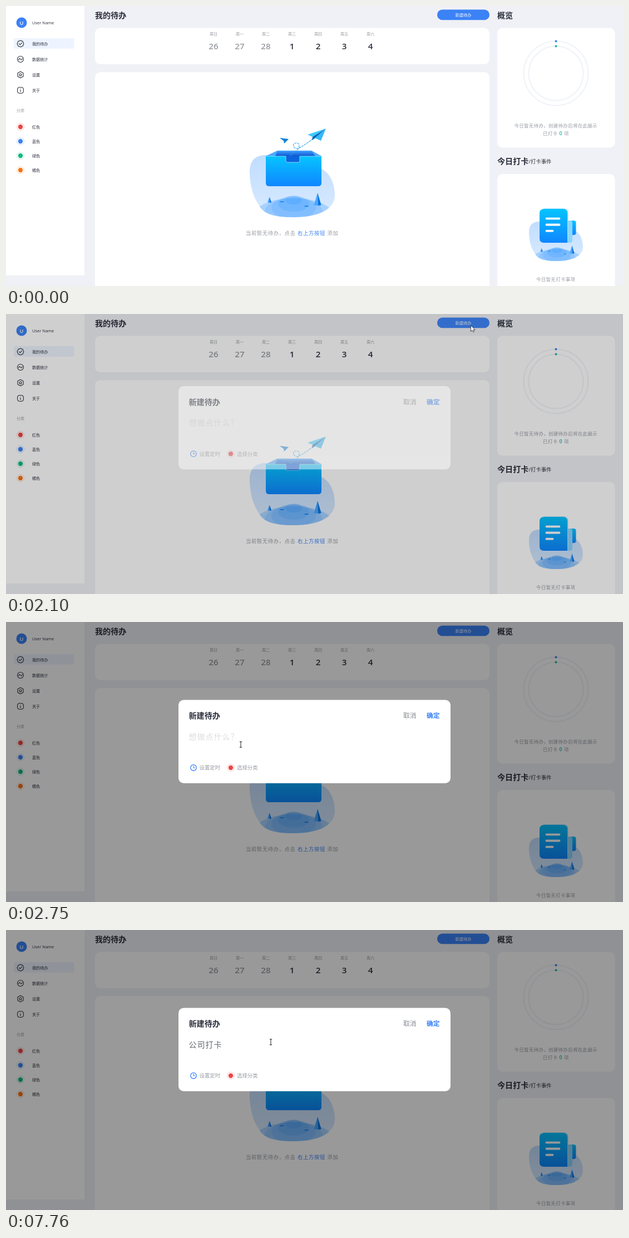
Animation of 1109x505 px, one loop 7.99 s. Source, as an HTML page:

```html
<!DOCTYPE html>
<html>
<head>
<meta charset="utf-8">
<style>
html, body { margin: 0; width: 100%; height: 100%; overflow: hidden; background: #f0f1f6; }
svg { display: block; width: 100vw; height: 100vh; }
text { font-family: "Open Sans", "Noto Sans CJK SC", "Noto Sans CJK", sans-serif; white-space: pre; }
</style>
</head>
<body>
<svg id="stage" viewBox="0 0 1109 505"></svg>
<script>
const INK = '#2b2f3c', GRAY = '#999ca3', BLUE = '#3b82f6', RED = '#ef4444', GREEN = '#10b981';
const LOOP = 7990;

// Text whose glyphs are centred vertically on cy.
const text = (x, cy, str, size, fill = INK, weight = 400, extra = '') =>
  `<text x="${x}" y="${cy + size * .37}" font-size="${size}" fill="${fill}" font-weight="${weight}" ${extra}>${str}</text>`;
const rect = (x, y, w, h, r, fill, extra = '') =>
  `<rect x="${x}" y="${y}" width="${w}" height="${h}" rx="${r}" fill="${fill}" ${extra}/>`;
const circle = (x, y, r, fill, extra = '') =>
  `<circle cx="${x}" cy="${y}" r="${r}" fill="${fill}" ${extra}/>`;
const path = (d, fill, extra = '') => `<path d="${d}" fill="${fill}" ${extra}/>`;
const line = (d, color, width, extra = '') =>
  path(d, 'none', `stroke="${color}" stroke-width="${width}" stroke-linecap="round" stroke-linejoin="round" ${extra}`);
const gradient = (id, from, to) =>
  `<linearGradient id="${id}" x2="0" y2="1"><stop stop-color="${from}"/><stop offset="1" stop-color="${to}"/></linearGradient>`;
const spaced = em => `letter-spacing="${em}"`;
const centred = 'text-anchor="middle"';
const colorDot = (x, y, color) =>
  circle(x, y, 4.2, color) + circle(x, y, 6.3, 'none', `stroke="${color}" stroke-width=".7" opacity=".45"`);

function sidebar() {
  const badge = Array.from({ length: 33 }, (_, i) => {
    const a = i / 32 * 2 * Math.PI, r = 5.6 + .35 * Math.cos(8 * a);
    return `${(r * Math.cos(a)).toFixed(2)} ${(r * Math.sin(a)).toFixed(2)}`;
  });
  const icons = [
    `M${badge.join('L')}M-2.4 0L-.6 1.8 2.6 -1.6`,
    'M-5.5 0A5.5 5.5 0 1 0 5.5 0A5.5 5.5 0 1 0 -5.5 0M-3.4 1.3C-2 -2.6 -.9 -1.6 0 0S2 2 3.4 -1.3',
    'M0 -5.7L5 -2.9V2.9L0 5.7L-5 2.9V-2.9ZM-2 0A2 2 0 1 0 2 0A2 2 0 1 0 -2 0',
    'M0 -5.5C4.4 -5.5 5.5 -4.4 5.5 0S4.4 5.5 0 5.5S-5.5 4.4 -5.5 0S-4.4 -5.5 0 -5.5M0 -.4V2.6M0 -2.6V-2.5'
  ];
  const nav = ['我的待办', '数据统计', '设置', '关于'].map((label, i) =>
    line(icons[i], INK, 1.1, `transform="translate(26 ${68 + 28 * i})"`) + text(47, 68 + 28 * i, label, 7.1, INK, 500));
  const tags = [['红色', RED], ['蓝色', BLUE], ['绿色', GREEN], ['橘色', '#f97316']].map(([label, color], i) =>
    colorDot(26, 218 + 26 * i, color) + text(47, 218 + 26 * i, label, 7.1, INK, 500));
  return rect(0, 0, 141, 486, 0, '#fff') + circle(28, 30, 9.5, BLUE) +
    text(28, 30.3, 'U', 9.4, '#fff', 600, centred) + text(47, 30, 'User Name', 7.5, INK, 500) +
    rect(14, 58, 108.5, 19, 3, '#eef4ff') + nav.join('') + text(19, 188, '分类', 7.1, GRAY) + tags.join('');
}

// Pale hill with rippled ground and two cones, shared by both pictures.
function hill() {
  const blob = 'M438 303C437 280 447 269 466 269C500 268 520 292 562 292C580 297 591 317 591 341' +
    'C591 366 563 381 517 381C482 381 463 375 455 360C444 344 439 325 438 303Z';
  const ripples = [[72, 31, .3], [52, 25, .2], [40, 20, .2], [28, 14, .25], [15, 8, .3]].map(([rx, ry, o], i) =>
    `<ellipse cx="517" cy="${378 - i * 7}" rx="${rx}" ry="${ry}" fill="#3d9bff" opacity="${o}"/>`);
  const cone = (x, y, w, h) => path(`M${x} ${y - h}L${x - w} ${y}Q${x} ${y + 2} ${x + w} ${y}Z`, '#4aa8ff') +
    path(`M${x} ${y - h}L${x + w * .2} ${y + 1}L${x + w} ${y}Z`, '#0b72e0');
  return path(blob, 'url(#pale)') + `<g clip-path="url(#hillClip)">${ripples.join('')}</g>` +
    cone(473.5, 354, 3.5, 9.5) + cone(560, 359, 6.5, 22) +
    `<g fill="#1f86ee"><ellipse cx="496" cy="353" rx="4" ry="1"/><ellipse cx="540" cy="361" rx="4" ry="1"/></g>` +
    `<clipPath id="hillClip">${path(blob, '#000')}</clipPath>`;
}

function boxPicture() {
  return hill() +
    path('M467 271L488 261H549L567 271Z', 'url(#inner)') +
    path('M467 271L488 261L484 271ZM549 261L567 271H556Z', '#4aa9ff') +
    path('M467 271H567V319Q567 325 561 325H473Q467 325 467 319Z', 'url(#front)') +
    path('M503 271H528V279Q528 282 525 282H506Q503 282 503 279Z', '#0d63dd') +
    line('M467.5 271H503V279Q503 282 506 282H525Q528 282 528 279V271H566.5', '#8fe4ff', .9) +
    line('M467 271L488 261H549L567 271', '#6bbcff', .6) +
    line('M552 239C541 248 531 254 525 257C515 258 514 247 521 247C529 246 528 256 523 260C518 264 514 266 511 270', '#2ba3e8', 1.1, 'stroke-dasharray="3.2 2.2"') +
    path('M575 221L542 232L551 236Z', '#3fcaff') + path('M575 221L551 236L550 242L556 238Z', '#0d62b8') +
    path('M575 221L555 238L566 243Z', '#35b9f8') +
    path('M492 238L508 240L499 243Z', '#35c3fb') + path('M492 238L499 243L500 248L508 240Z', '#1680d5');
}

function notePicture() {
  return `<g transform="translate(662.3 218.4) scale(.634)">${hill().replaceAll('hillClip', 'noteClip')}</g>` +
    rect(1010, 387, 14.5, 26, 4, 'url(#front)') + rect(1008, 387, 10, 40, 4, '#8bd5ff') +
    rect(961, 365, 49.5, 61, 8, '#a8dcff') + path('M967 366H1001Q1009 366 1009 374V427H967Q959 427 959 419V374Q959 366 967 366Z', 'url(#front)') +
    line('M971.5 383.3H994.5M971.5 394.5H994.5M971.5 405.7H982.5', '#fff', 3.8);
}

function page() {
  const days = [...'日一二三四五六'].map((day, i) => {
    const x = 373 + 47 * i;
    return text(x, 50, '周' + day, 7.1, GRAY, 400, centred) +
      text(x, 72, [26, 27, 28, 1, 2, 3, 4][i], 15.2, i < 3 ? GRAY : INK, 600, centred);
  });
  const ring = (r, color) => circle(988.5, 121.5, r, 'none', 'stroke="#f0f3f8" stroke-width="2.2"') +
    circle(988.5, 121.5 - r, 2, color);
  return rect(0, 0, 1109, 505, 0, '#f0f1f6') + sidebar() +
    text(160, 16.5, '我的待办', 14.1, INK, 700) + text(883, 16.5, '概览', 14.1, INK, 700) +
    rect(775, 6.5, 94, 18.7, 9.3, BLUE, 'id="button"') + text(822, 16, '新建待办', 7.2, '#fff', 500, centred) +
    rect(160, 39.5, 709, 65.5, 9.5, '#fff') + days.join('') +
    rect(160, 119.3, 709, 420, 9.5, '#fff') + boxPicture() +
    text(431, 409.5, '当前暂无待办，点击', 9.4, GRAY, 400, spaced(.55)) +
    text(524, 409.5, '右上方按钮', 9.4, BLUE, 400, spaced(.6)) + text(577.5, 409.5, '添加', 9.4, GRAY, 400, spaced(.55)) +
    rect(883, 39.5, 211.5, 216, 9.5, '#fff') + ring(58, BLUE) + ring(49, '#14b8a6') +
    text(913.5, 215.5, '今日暂无待办，创建待办后将在此展示', 8.45, GRAY, 400, spaced(.35)) +
    text(965, 229.5, '已打卡', 8.45, GRAY, 400, spaced(.45)) + text(997, 229.5, '0', 8.9, '#14b8a6', 600, centred) +
    text(1003, 229.5, '项', 8.45, GRAY) +
    text(883, 280, '今日打卡', 14.1, INK, 700) + text(939.5, 281, '/打卡事件', 9.4, INK, 500) +
    rect(883, 303, 211.5, 240, 9.5, '#fff') + notePicture() +
    text(953, 492.5, '今日暂无打卡事项', 8.45, GRAY, 400, spaced(.35));
}

const dialog = () => rect(310, 140.5, 489, 150.3, 9.5, '#fff') +
  text(328.5, 169, '新建待办', 14.1, INK, 700) +
  text(714, 169, '取消', 11.8, '#85888f', 500) + text(756, 169, '确定', 11.8, BLUE, 700) +
  '<g id="entry"></g>' + rect(0, 197, 1, 19, 0, '#555', 'id="caret"') +
  circle(337, 262.7, 5.3, 'none', `stroke="${BLUE}" stroke-width="1.3"`) + line('M337 259.6V263H339.6', BLUE, 1.1) +
  text(347.5, 262.7, '设置定时', 9.4, GRAY) + colorDot(404, 262.7, RED) + text(415, 262.7, '选择分类', 9.4, GRAY);

document.getElementById('stage').innerHTML =
  `<defs>${gradient('pale', '#c0ddff', '#d9eaff')}${gradient('front', '#06c4ff', '#0f86ff')}${gradient('inner', '#3f9dff', '#0c57cf')}</defs>` +
  page() + rect(0, 0, 1109, 505, 0, '#000', 'id="mask"') + `<g id="dialog">${dialog()}</g><g id="popup"></g>` +
  path('M0 0V11L2.6 8.6 4.3 12.2 6 11.4 4.4 8H7.6Z', '#fff', 'id="arrow" stroke="#222" stroke-width=".8"') +
  line('M-1.8 -5H1.8M0 -5V5M-1.8 5H1.8', '#222', 1, 'id="beam"');

const [button, mask, modal, entry, caret, popup, arrow, beam] =
  ['button', 'mask', 'dialog', 'entry', 'caret', 'popup', 'arrow', 'beam'].map(id => document.getElementById(id));

// Start time, committed text, pinyin being composed, candidates.
const GONGSI = '公司 功时 公式 公示 工商 共识';
const typing = [
  [0, '', '', ''],
  [5450, '', 'g', '公司 刚刚 感觉 过来 跟我 过去 改一下 更'],
  [5630, '', 'go', '公司 购物 够了 狗狗 勾选 沟通 购买了'],
  [5810, '', 'gon', '公司 工作 共同 公里 功能 公共 工作人'],
  [6040, '', 'gong', '公司 工作 共同 公里 功能 公共 工作人员了'],
  [6140, '', 'gong', GONGSI],
  [6190, '', 'gongs', GONGSI],
  [6290, '', 'gongsi', GONGSI],
  [6530, '公司', '', ''],
  [6650, '公司', 'd', '的 都 大家 到 多少 但是 等一下'],
  [6750, '公司', 'd', '的 大家 多少 但是 得到 当然 等一下'],
  [6970, '公司', 'da', '大家 打开 大 答案 达到 打算 大多数'],
  [7070, '公司', 'dak', '打卡 打开 大 大客 大块 打孔 大卡'],
  [7220, '公司打卡', '', '']
];
const caretToggles = [2850, 3360, 3920, 4430, 4990, 7740];
const pointer = [
  [500, 1056, 492], [700, 1015, 380], [1000, 900, 140], [1260, 842, 45], [1310, 842, 44], [1640, 837, 19],
  [2050, 837, 19], [2150, 834, 22], [2300, 730, 90], [2450, 520, 205], [2570, 437, 245], [2750, 422, 221],
  [2950, 421.5, 216.5], [3230, 421.5, 216.5], [3360, 420, 216], [7640, 420, 216], [7760, 476, 202]
];

function pointerAt(t) {
  const i = pointer.findIndex(key => key[0] > t);
  if (i < 0) return pointer.at(-1).slice(1);
  const [t0, x0, y0] = pointer[i - 1], [t1, x1, y1] = pointer[i], k = (t - t0) / (t1 - t0);
  return [x0 + (x1 - x0) * k, y0 + (y1 - y0) * k];
}

function candidateBar(left, words) {
  let x = left;
  const cells = words.split(' ').slice(0, 7).map((word, i) => {
    const width = 25 + 10.3 * word.length, first = i === 0;
    const cell = (first ? rect(x, 217.5, width, 25.5, 0, '#0078d7') : '') +
      text(x + 10, 231.3, i + 1, 6.5, first ? '#fff' : '#777') +
      text(x + 16, 230.7, word, 10.3, first ? '#fff' : '#111');
    x += width;
    return cell;
  });
  return rect(left, 217, x - left, 26.5, 0, '#fff') + cells.join('') +
    line(`M${left} 217.5H${x}M${left} 242.8H${x}`, '#0078d7', 1);
}

let shown;
function showTyping(state) {
  if (state === shown) return;
  shown = state;
  const [, done, pinyin, words] = state, x = 328.5 + 15 * done.length;
  entry.innerHTML = done || pinyin
    ? text(328.5, 206.5, done, 14.1, '#666970', 300, spaced(.9)) + text(x, 207, pinyin, 14.5, '#666970', 400, spaced(1.5))
    : text(328.5, 206.5, '想做点什么？', 14.1, '#dcdde0', 300, spaced(.9));
  caret.setAttribute('x', x + (pinyin ? entry.lastChild.getComputedTextLength() : .2));
  popup.innerHTML = words ? candidateBar(done ? 356 : 326, words) : '';
}

function render(t) {
  const opening = 1 - (1 - Math.min(1, Math.max(0, (t - 2000) / 400))) ** 2.2;
  mask.setAttribute('opacity', .4 * opening);
  modal.setAttribute('opacity', opening);
  modal.setAttribute('transform', `translate(0 ${-20 * (1 - opening)})`);
  button.setAttribute('fill', t > 1550 && t < 2180 ? '#3f86fa' : BLUE);

  showTyping(typing.findLast(state => state[0] <= t));
  const caretOn = caretToggles.filter(time => time <= t).length % 2;
  caret.setAttribute('visibility', caretOn ? 'visible' : 'hidden');

  const inField = t >= 2570;
  arrow.setAttribute('visibility', t >= 500 && !inField ? 'visible' : 'hidden');
  beam.setAttribute('visibility', inField ? 'visible' : 'hidden');
  if (t >= 500) (inField ? beam : arrow).setAttribute('transform', `translate(${pointerAt(t)})`);
}

const start = performance.now();
function tick() {
  render((performance.now() - start) % LOOP);
  requestAnimationFrame(tick);
}
tick();
</script>
</body>
</html>
```
